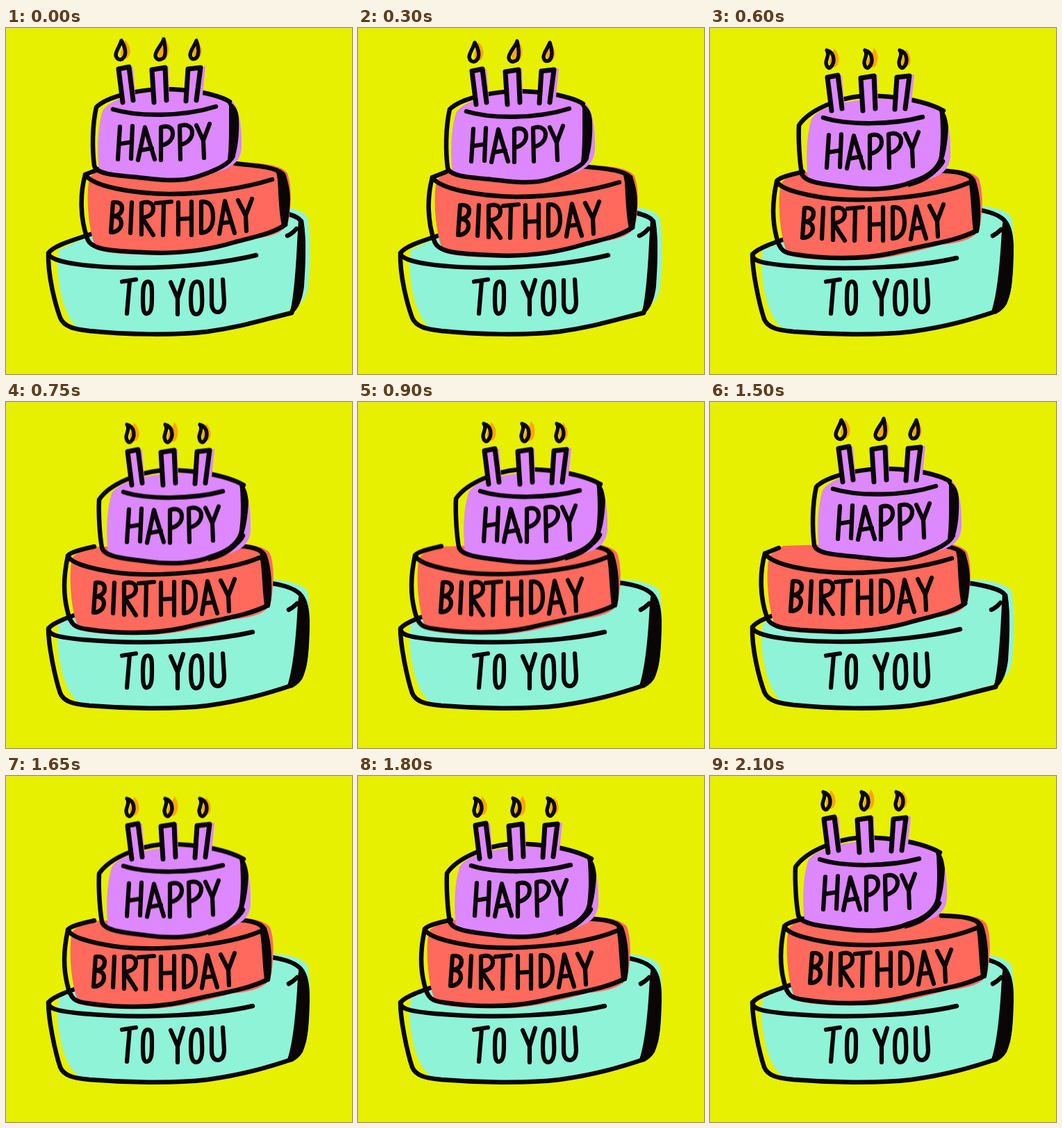
Write an HTML page that moves like this. It is 498x498 px and loops after 2.25 s.

```html
<!DOCTYPE html>
<html lang="en">
<head>
<meta charset="utf-8">
<title>Happy birthday to you</title>
<style>
  html, body { margin: 0; width: 100%; height: 100%; overflow: hidden; background: #e6f000; }
  svg { display: block; width: 100vw; height: 100vh; }
  .line { fill: none; stroke: #0a0507; stroke-width: 6.5; stroke-linecap: round; stroke-linejoin: round; }
  .text { stroke-width: 6.2; }
  .candles { stroke-width: 7; }
  .wicks { stroke-width: 5.4; }
  .ink { fill: #0a0507; }
  .mint { fill: #8ff3d7; }
  .coral { fill: #ff6a5c; }
  .lilac { fill: #dd88ff; }
  .flame { fill: #ffa60a; }

  .a, .b, #top, #mid { animation: 2250ms step-end infinite; }
  .a { animation-name: show-a; }
  .b { animation-name: show-b; }
  #top { animation-name: sway-top; }
  #mid { animation-name: sway-mid; }

  /* two hand-drawn contours take turns */
  @keyframes show-a {
    0%, 53.33% { visibility: visible; }
    26.66%, 73.33%, 100% { visibility: hidden; }
  }
  @keyframes show-b {
    0%, 53.33% { visibility: hidden; }
    26.66%, 73.33%, 100% { visibility: visible; }
  }
  @keyframes sway-top {
    0%, 100% { transform: translate(0, 0); }
    6.66% { transform: translate(.7px, 1px); }
    13.33%, 93.33% { transform: translate(2px, 3px); }
    20%, 86.66% { transform: translate(4px, 7px); }
    26.66%, 80% { transform: translate(7px, 12px); }
    33.33%, 73.33% { transform: translate(13px, 12.5px); }
    40% { transform: translate(20px, 11.2px); }
    46.66% { transform: translate(23px, 9.5px); }
    53.33%, 60% { transform: translate(24px, 8px); }
    66.66% { transform: translate(23px, 8px); }
  }
  @keyframes sway-mid {
    0%, 100% { transform: translate(0, 0); }
    6.66% { transform: translate(-3px, 2px); }
    13.33%, 93.33% { transform: translate(-7px, 4px); }
    20%, 86.66% { transform: translate(-12px, 6.3px); }
    26.66%, 80% { transform: translate(-18px, 8px); }
    33.33%, 73.33% { transform: translate(-25px, 9px); }
    40% { transform: translate(-32px, 8.5px); }
    46.66% { transform: translate(-35px, 7.6px); }
    53.33%, 60% { transform: translate(-37px, 7px); }
    66.66% { transform: translate(-35px, 7px); }
  }
</style>
</head>
<body>
<svg viewBox="0 0 498 498" role="img" aria-label="Happy birthday to you">
  <g id="base">
    <path class="mint" d="M76 319L118 300L360 256C395 254 426 260 434 273C439 300 438 350 434 376C430 396 418 402 398 410C360 420 320 436 270 441C210 443 140 440 108 434C86 424 74 375 74 338Z"/>
    <g class="line a">
      <path d="M124 296C98 305 68 313 61 324C62 339 130 345 190 345C255 345 320 337 360 327"/>
      <path d="M61 324C60 355 70 395 78 417C84 432 104 434 120 436C170 441 240 443 290 437C340 430 370 420 411 410"/>
      <path d="M360 259C385 262 418 268 424 277C430 300 428 370 411 410M405 299Q412 296 418 289"/>
      <path class="ink" d="M421 275L428 276C432 300 432 330 429 372C426 395 418 410 408 413C414 390 417 350 419 310Z" stroke="none"/>
    </g>
    <g class="line b">
      <path d="M124 298C95 308 70 316 62 325C58 336 80 339 110 342C200 350 300 344 355 331"/>
      <path d="M61 326C61 350 70 395 78 419C84 434 104 435 120 437C170 441 240 443 290 437C340 430 375 420 411 408"/>
      <path d="M360 259C390 260 420 267 427 282C435 310 435 370 424 396Q419 404 411 408M407 299Q413 296 419 290"/>
      <path class="ink" d="M422 274C434 278 438 300 437 325C436 360 434 384 427 395L411 409L404 411C414 385 418 330 420 290Z" stroke="none"/>
    </g>
    <g class="line text">
      <path d="M167 365L187 362M178 364L174 411"/>
      <path d="M204 365C197 365 197 378 197 390C197 404 198 412 203 411C210 410 210 398 210 385C210 372 210 365 204 365Z"/>
      <path d="M237 366L247 389L255 363M247 389L247 412"/>
      <path d="M275 365C267 365 266 378 266 390C266 404 268 412 274 412C282 411 283 398 282 385C282 372 281 365 275 365Z"/>
      <path d="M296 363L296 395C296 405 300 409 305 409C312 408 314 402 314 394L312 362"/>
    </g>
  </g>

  <g id="mid">
    <path class="coral" d="M122 213L140 200L330 194C360 193 396 196 405 209C411 225 411 250 407 276C404 293 385 301 350 304C300 318 260 327 220 326C180 327 145 324 131 319C120 300 115 250 119 222Z"/>
    <g class="line a">
      <path d="M134 203L114 211C125 228 180 238 235 239C290 239 345 230 383 218"/>
      <path d="M114 211C106 240 107 275 117 303C122 319 150 321 200 323C250 326 290 320 330 308C365 299 385 295 402 283"/>
      <path d="M330 195C360 198 388 200 398 210C404 225 406 255 402 283"/>
      <path class="ink" d="M388 203L402 209C407 225 411 240 408 262C407 275 405 285 398 288C393 270 392 235 391 218Z" stroke="none"/>
    </g>
    <g class="line b">
      <path d="M152 199C135 203 120 206 114 212C118 224 150 231 180 236C240 244 340 236 390 215"/>
      <path d="M114 213C108 240 107 265 113 290C118 314 126 316 142 318C180 324 235 326 280 316C330 303 370 300 401 284"/>
      <path d="M340 197C370 198 390 200 397 211C404 230 406 260 402 284"/>
      <path class="ink" d="M390 201C400 206 405 225 406 250C407 270 406 283 398 290C394 265 394 235 391 218Z" stroke="none"/>
    </g>
    <g class="line text">
      <path d="M154 251L151 294C160 294 166 288 166 281C166 274 161 271 154 271C162 270 167 266 167 259C167 252 161 250 154 251Z"/>
      <path d="M181 251L179 295"/>
      <path d="M195 297L195 252C206 248 212 253 212 260C212 268 205 272 196 273L212 298"/>
      <path d="M216 252L238 250M227 252L226 298"/>
      <path d="M248 251L248 297M267 250L267 298M248 275L267 274"/>
      <path d="M281 250L281 295C292 294 298 286 298 272C298 257 293 249 281 250Z"/>
      <path d="M307 296L315 249L329 295M310 281L324 279"/>
      <path d="M334 248L345 270L354 246M345 270L346 292"/>
    </g>
  </g>

  <g id="top">
    <path class="lilac" d="M139 119C150 102 185 93 220 91C260 88 305 90 327 107C337 118 340 150 339 172C338 192 325 202 300 208C275 218 245 222 210 218C175 216 145 212 134 205C131 180 131 145 139 119Z"/>
    <g class="line a">
      <path d="M322 106C300 93 255 87 220 88C185 90 145 99 130 114C124 140 124 175 127 198C130 211 160 212 190 215C225 219 250 222 275 214C300 206 322 196 327 184"/>
      <path d="M154 117C190 128 255 128 302 113"/>
      <path class="ink" d="M316 103C328 108 334 116 335 130C336 150 334 172 329 186L318 196C322 175 321 140 321 112Z" stroke="none"/>
    </g>
    <g class="line b">
      <path d="M329 107C300 91 250 84 210 86C180 89 137 104 121 128C120 150 122 180 125 197C128 211 160 213 190 217C225 222 260 220 285 209C305 203 322 192 328 180"/>
      <path d="M156 117C190 128 255 128 299 116"/>
      <path class="ink" d="M322 102C331 107 334 114 336 130C335 155 331 180 322 192C312 205 295 213 278 217L280 208C305 200 320 188 323 172C326 150 325 130 324 112Z" stroke="none"/>
    </g>

    <g class="lilac">
      <path d="M165 58L183 56L187 108L171 109Z"/>
      <path d="M213 58L234 55L235 107L214 109Z"/>
      <path d="M265 57L287 55L282 106L262 108Z"/>
    </g>
    <g class="line candles">
      <path d="M168 107L162 59L177 56L183 104"/>
      <path d="M213 107L210 60L229 57L231 104"/>
      <path d="M259 105L262 59L280 57L274 104"/>
    </g>

    <g class="flame">
      <path d="M171 17C180 25 181 37 175 43C169 47 164 42 165 35C166 28 171 25 171 17Z"/>
      <path d="M229 16C236 24 236 36 231 43C225 48 218 43 219 36C221 28 228 25 229 16Z"/>
      <path d="M275 18C282 26 284 36 279 42C273 46 268 41 269 35C270 28 275 25 275 18Z"/>
    </g>
    <g class="line wicks a">
      <path d="M166 18C164 26 158 33 158 39C159 45 164 47 168 44C175 38 171 26 166 18Z"/>
      <path d="M227 16C224 25 215 32 215 40C216 46 222 47 227 43C231 37 229 25 227 16Z"/>
      <path d="M274 18C272 25 265 32 265 39C266 45 270 46 274 43C279 37 277 27 274 18Z"/>
    </g>
    <g class="line wicks b">
      <path id="curl" d="M161 20C166 25 160 32 160 38C161 45 164 47 167 44C173 38 173 23 161 20Z"/>
      <use href="#curl" x="55"/>
      <use href="#curl" x="105"/>
    </g>

    <g class="line text">
      <path d="M164 142L161 189M182 141L180 188M163 167L181 164"/>
      <path d="M190 190L200 143L214 189M194 176L210 173"/>
      <path d="M223 190L223 143C235 139 240 145 240 152C240 161 233 167 224 169"/>
      <path d="M251 189L250 141C261 137 268 143 268 150C268 159 261 166 251 168"/>
      <path d="M274 140L284 162L293 138M284 162L285 187"/>
    </g>
  </g>
</svg>
</body>
</html>
```
